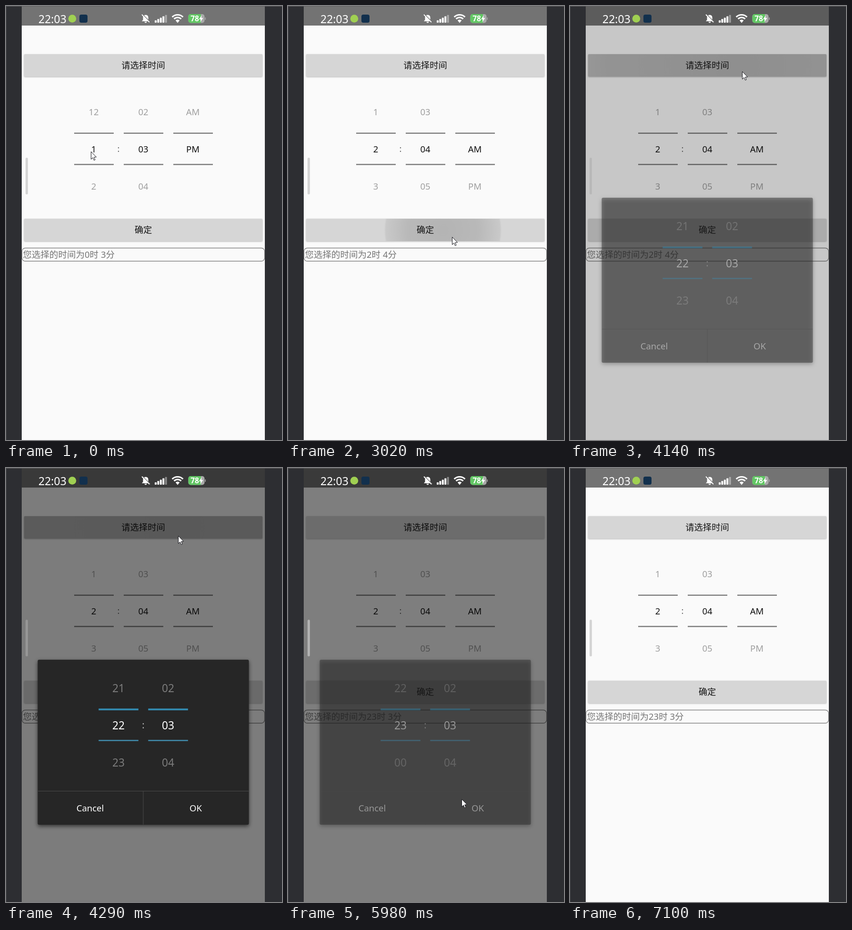
Recreate the animation shown at these times as an HTML page with a canvas. Size 579 px wide and 910 px high, loop 7.57 s.

```html
<!DOCTYPE html>
<html lang="zh-CN">
<head>
<meta charset="utf-8">
<title>Time picker</title>
<style>
  html, body { margin: 0; width: 100%; height: 100%; overflow: hidden; background: #2d2e32; }
  canvas { display: block; }
</style>
</head>
<body>
<canvas id="stage" width="579" height="910"></canvas>
<script>
const ctx = document.getElementById('stage').getContext('2d');
const LOOP = 7570;
const FONT = '"Noto Sans", "Noto Sans CJK SC", "Noto Sans CJK", sans-serif';
const ROW = 78;      // distance between wheel rows
const GLIDE = 400;   // duration of one pointer move

// Moments of the story, in ms
const CONFIRM = 2900, OPEN = 3700, DIALOG = 4040, ACCEPT = 5860, LEAVE = 7090;

const clamp = (v, lo = 0, hi = 1) => Math.min(hi, Math.max(lo, v));
const ramp = (t, a, b) => clamp((t - a) / (b - a));
const smooth = k => k * k * (3 - 2 * k);
const ease = (t, a, b = a + GLIDE) => smooth(ramp(t, a, b));

function rect(x, y, w, h, fill) {
  ctx.fillStyle = fill;
  ctx.fillRect(x, y, w, h);
}

function rounded(x, y, w, h, r, fill) {
  ctx.beginPath();
  ctx.roundRect(x, y, w, h, r);
  if (fill) {
    ctx.fillStyle = fill;
    ctx.fill();
  }
}

function polygon(points, fill) {
  ctx.beginPath();
  points.forEach(p => ctx.lineTo(...p));
  ctx.closePath();
  ctx.fillStyle = fill;
  ctx.fill();
}

function text(s, x, y, size, color, align = 'center', weight = 400) {
  ctx.font = `${weight} ${size}px ${FONT}`;
  ctx.textAlign = align;
  ctx.fillStyle = color;
  ctx.fillText(s, x, y);
}

const pad = n => String(n).padStart(2, '0');

function wheel(x, y, pos, size, color, label) {
  const base = ctx.globalAlpha;
  const first = Math.floor(pos) - 1;
  for (let i = first; i < first + 4; i++) {
    const d = (i - pos) * ROW;
    ctx.globalAlpha = base * clamp((107 - Math.abs(d)) / 74);
    text(label(i), x, y + d + size * 0.357, size, color);
  }
  ctx.globalAlpha = base;
}

// Press wave spreading from cx, held for a while, then fading
function ripple(y, age, cx, hold) {
  const strength = 0.16 * (1 - ramp(age, hold, hold + 300));
  if (age <= 0 || !strength) return;
  const g = ctx.createRadialGradient(cx, y + 24, 0, cx, y + 24, age * 1.02);
  for (const [stop, k] of [[0, 1], [0.6, 0.85], [0.97, 0.4], [1, 0]]) {
    g.addColorStop(stop, `rgba(0,0,0,${strength * k})`);
  }
  rounded(38, y, 500, 47, 2, g);
}

function button(y, label, age, cx, hold) {
  ctx.save();
  ctx.shadowColor = 'rgba(0,0,0,.28)';
  ctx.shadowBlur = 3;
  ctx.shadowOffsetY = 1;
  rounded(38, y, 500, 47, 2, '#d6d6d6');
  ctx.restore();
  ripple(y, age, cx, hold);
  text(label, 288, y + 30, 18.3, '#151515', 'center', 500);
}

function page(t) {
  rect(33, 1, 510, 909, '#fafafa');
  rect(33, 1, 510, 40, '#737373');
  button(101, '请选择时间', t - OPEN, 352, 600);
  button(446, '确定', t - CONFIRM, 325, 280);

  for (const x of [184, 288, 392]) {
    rect(x - 41, 265.5, 83, 2.5, '#808080');
    rect(x - 41, 331, 83, 2.5, '#808080');
  }
  wheel(184, 300, 1 + ease(t, 480), 18.5, '#111', i => (i + 11) % 12 + 1);
  wheel(288, 300, 3 + ease(t, 1380), 18.5, '#111', pad);
  wheel(392, 300, 1 - ease(t, 2050), 18.5, '#111', i => ['AM', 'PM'][i] || '');
  text(':', 236, 306, 18.5, '#666');

  rounded(33.5, 507.5, 509, 27.5, 7);
  ctx.strokeStyle = '#858585';
  ctx.lineWidth = 1.3;
  ctx.stroke();
  const picked = t < CONFIRM + 110 ? '0时 3分' : t < ACCEPT + 110 ? '2时 4分' : '23时 3分';
  text('您选择的时间为' + picked, 35.5, 527.5, 18.5, '#757575', 'left');
}

function bell() {
  ctx.save();
  ctx.translate(293, 26);
  ctx.fillStyle = '#fff';
  ctx.beginPath();
  ctx.moveTo(-8, 6);
  ctx.lineTo(-5.5, 3);
  ctx.lineTo(-5.5, -2);
  ctx.bezierCurveTo(-5.5, -9, 5.5, -9, 5.5, -2);
  ctx.lineTo(5.5, 3);
  ctx.lineTo(8, 6);
  ctx.fill();
  ctx.beginPath();
  ctx.arc(0, 7, 2.4, 0, Math.PI);
  ctx.fill();
  ctx.lineWidth = 1.8;
  for (const [shift, color] of [[1.6, '#666'], [0, '#fff']]) {
    ctx.strokeStyle = color;
    ctx.beginPath();
    ctx.moveTo(shift - 8, -8);
    ctx.lineTo(shift + 8, 8);
    ctx.stroke();
  }
  ctx.restore();
}

function wifi(x, y) {
  const from = Math.PI * 1.25, to = Math.PI * 1.75;
  ctx.strokeStyle = ctx.fillStyle = '#fff';
  ctx.lineWidth = 3.2;
  for (const r of [16, 10.5]) {
    ctx.beginPath();
    ctx.arc(x, y, r, from, to);
    ctx.stroke();
  }
  ctx.beginPath();
  ctx.moveTo(x, y + 1);
  ctx.arc(x, y, 6, from, to);
  ctx.fill();
}

function battery() {
  ctx.save();
  rounded(382.5, 17, 34, 18.5, 5);
  ctx.clip();
  rect(382, 17, 35, 19, '#a9a9a9');
  rect(382, 17, 27, 19, '#62c764');
  ctx.restore();
  rect(417.5, 24, 1.5, 5, '#a9a9a9');
  text('78', 396, 32, 15.5, '#fff', 'center', 600);
  polygon([[410.5, 19.5], [405, 28], [408.5, 28], [407.5, 34], [413.5, 25], [409.8, 25]], '#fff');
}

function statusBar() {
  text('22:03', 68, 35.5, 23, '#fff', 'left', 500);
  ctx.fillStyle = '#a0d052';
  ctx.beginPath();
  ctx.arc(139, 26.5, 8.3, 0, 7);
  ctx.fill();
  rounded(154, 18, 17, 17, 4, '#12304d');
  bell();
  for (let i = 0; i < 5; i++) {
    const h = 5 + i * 2.8;
    rounded(312 + i * 5.4, 35 - h, 4, h, 1, i < 4 ? '#fff' : 'rgba(255,255,255,.4)');
  }
  wifi(360, 34.5);
  battery();
}

function dialog(t) {
  const alpha = ramp(t, DIALOG, DIALOG + 220) * (1 - ramp(t, ACCEPT, ACCEPT + 220));
  if (!alpha) return;
  ctx.save();
  ctx.globalAlpha = alpha;
  ctx.shadowColor = 'rgba(0,0,0,.6)';
  ctx.shadowBlur = 9;
  ctx.shadowOffsetY = 3;
  rounded(66.5, 402, 443, 346, 3, '#262626');
  ctx.shadowColor = 'transparent';

  for (const x of [236, 340]) {
    rect(x - 41.7, 504.3, 83.5, 3.8, '#338ab0');
    rect(x - 41.7, 570, 83.5, 2.6, '#4088a8');
  }
  wheel(236, 540, 22 + ease(t, 4600), 22.7, '#fff', i => pad(i % 24));
  wheel(340, 540, 3, 22.7, '#fff', pad);
  text(':', 288, 546, 20, '#bbb');

  rect(67, 677, 442, 1, '#4b4b4b');
  rect(287.5, 678, 1, 69.5, '#4b4b4b');
  text('Cancel', 176.5, 720, 18.5, '#fff');
  text('OK', 398, 720, 18.5, '#fff');
  ctx.restore();
}

// Each stop: when the pointer sets off, and where it glides to
const stops = [
  [80, 180, 385], [480, 180, 300], [880, 288, 384], [1380, 288, 300],
  [1700, 384, 212], [2050, 380, 290], [2350, 344, 484], [3180, 361, 133],
  [4010, 361, 142], [4300, 248, 545], [4600, 254, 437], [5180, 364, 694], [6400, 446, 852]
];

function pointer(t) {
  let x = 178, y = 305;
  stops.forEach(([at, tx, ty], i) => {
    const next = stops[i + 1] ? stops[i + 1][0] : LOOP;
    const begin = Math.max(at, 270);
    const k = ease(t, begin, Math.min(begin + GLIDE, next));
    x += (tx - x) * k;
    y += (ty - y) * k;
  });
  ctx.save();
  ctx.translate(Math.round(x) + 0.5, Math.round(y) + 0.5);
  polygon([[0, 0], [0, 15.8], [3.6, 12.5], [6.1, 18], [8.5, 17], [6.1, 11.6], [11, 11.3]], '#fff');
  ctx.strokeStyle = '#16161c';
  ctx.lineWidth = 1;
  ctx.stroke();
  ctx.restore();
}

function draw(t) {
  rect(0, 0, 579, 910, '#2d2e32');
  rect(0, 0, 579, 1, '#606062');
  rect(0, 0, 1, 910, '#48494c');
  page(t);

  const dim = ramp(t, DIALOG, DIALOG + 300) * (1 - ramp(t, ACCEPT + 60, ACCEPT + 420));
  rect(33, 1, 510, 909, `rgba(0,0,0,${0.6 * dim})`);
  statusBar();

  const shade = ramp(t, DIALOG, DIALOG + 220) - ramp(t, ACCEPT, ACCEPT + 270);
  const grey = 212 - 62 * shade;
  rounded(41, 318, 5, 77, 2.5, `rgb(${grey},${grey},${grey})`);

  dialog(t);
  if (t < LEAVE) pointer(t);
}

const start = performance.now();
function frame() {
  draw((performance.now() - start) % LOOP);
  requestAnimationFrame(frame);
}
frame();
</script>
</body>
</html>
```
